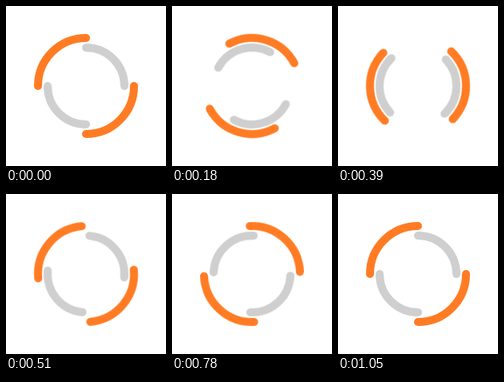
These frames come from a looping animation (200x200 px, 1080 ms). An HTML page:

```html
<!DOCTYPE html>
<html lang="en">
<head>
<meta charset="utf-8">
<title>Double ring loader</title>
<style>
  html, body {
    margin: 0;
    width: 100%;
    height: 100%;
    overflow: hidden;
    background: #fff;
  }
  svg {
    display: block;
    width: 100vw;
    height: 100vh;
  }
  circle {
    fill: none;
    stroke-width: 10;
    stroke-linecap: round;
    stroke-dasharray: 1 1; /* quarter arcs, see pathLength */
    transform-origin: 100px 100px;
    /* 36 poses of 30 ms; the last pose equals the first */
    animation: 1080ms steps(36, jump-none) infinite;
  }
  .outer {
    stroke: #ff7c24;
    animation-name: clockwise;
  }
  .inner {
    stroke: #cfcfcf;
    animation-name: counter;
  }
  @keyframes clockwise {
    from { transform: rotate(0deg); }
    to { transform: rotate(360deg); }
  }
  @keyframes counter {
    from { transform: rotate(90deg); }
    to { transform: rotate(-270deg); }
  }
</style>
</head>
<body>
<svg viewBox="0 0 200 200">
  <circle class="outer" cx="100" cy="100" r="60" pathLength="4"/>
  <circle class="inner" cx="100" cy="100" r="48" pathLength="4"/>
</svg>
</body>
</html>
```
